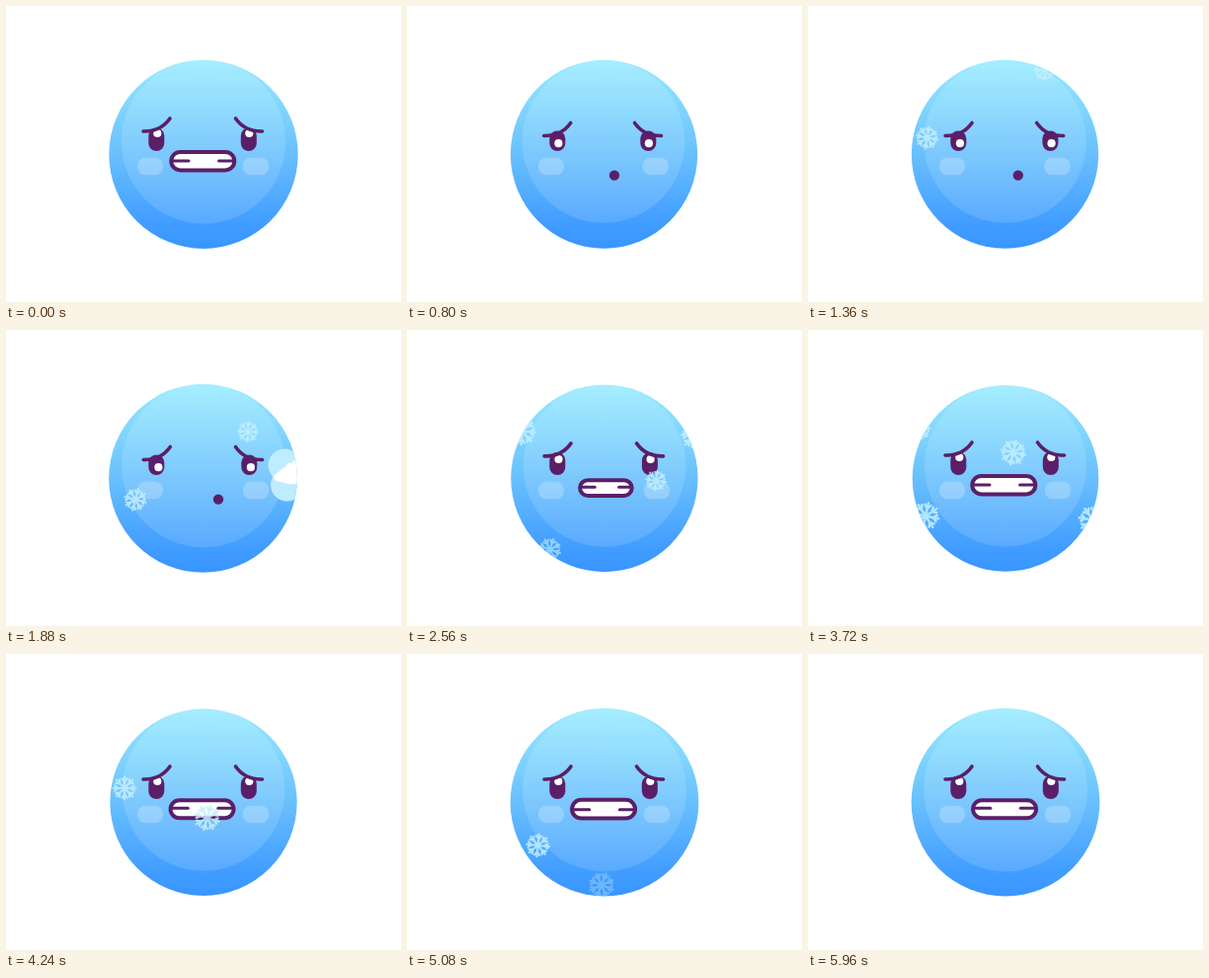
An HTML page with a canvas for the animation above (6000 ms loop, 400x300 px).

```html
<!DOCTYPE html>
<html lang="en">
<head>
<meta charset="utf-8">
<title>Freezing face</title>
<style>
  html, body { margin: 0; width: 100%; height: 100%; overflow: hidden; background: #fff; }
  canvas { display: block; width: 400px; height: 300px; }
</style>
</head>
<body>
<canvas id="stage"></canvas>
<script>
const LOOP = 6000, STEP = 40, TAU = Math.PI * 2;
const DARK = '#5a1f68';
const canvas = document.getElementById('stage');
const ctx = canvas.getContext('2d');
const dpr = window.devicePixelRatio || 1;
canvas.width = 400 * dpr;
canvas.height = 300 * dpr;

// Each flake passes (x, y) at time t; speeds are in px per second.
const flakes = [
  { t: 1880, x: 131, y: 172, vx: 20, vy: 74, r: 12, turn: 0.25 },
  { t: 1880, x: 245, y: 103, vx: 10.6, vy: 73, r: 11, turn: 0.05 },
  { t: 3200, x: 118, y: 150, vx: 2, vy: 74, r: 14.5, turn: 0.15 },
  { t: 3200, x: 212, y: 82, vx: -8, vy: 81, r: 13.5, turn: 0.15 },
  { t: 3200, x: 290, y: 154, vx: -3, vy: 74, r: 15, turn: 0.1 },
  { t: 4240, x: 120, y: 136, vx: 15, vy: 69, r: 12.5, turn: 0 }
];

const clamp = v => Math.max(0, Math.min(1, v));
const mix = (a, b, k) => a + (b - a) * k;
const ease = (t, a, b) => {
  const k = clamp((t - a) / (b - a));
  return k * k * (3 - 2 * k);
};

function ellipse(x, y, rx, ry, fill) {
  ctx.beginPath();
  ctx.ellipse(x, y, rx, ry, 0, 0, TAU);
  ctx.fillStyle = fill;
  ctx.fill();
}

function pill(x, y, w, h, r, fill) {
  ctx.beginPath();
  ctx.roundRect(x - w / 2, y - h / 2, w, h, r);
  ctx.fillStyle = fill;
  ctx.fill();
}

function line(x1, y1, x2, y2) {
  ctx.beginPath();
  ctx.moveTo(x1, y1);
  ctx.lineTo(x2, y2);
  ctx.stroke();
}

function drawBall(rx, ry, cx, turn) {
  const base = ctx.createLinearGradient(0, 55, 0, 245);
  base.addColorStop(0, '#98ebff');
  base.addColorStop(0.5, '#69c0fd');
  base.addColorStop(0.88, '#409cff');
  base.addColorStop(1, '#3996ff');
  ellipse(cx, 150.3, rx, ry, base);
  const k = rx / 95;
  ctx.save();
  ctx.beginPath();
  ctx.ellipse(cx, 150.3, rx, ry, 0, 0, TAU);
  ctx.clip();
  ellipse(cx + turn * 0.5, 137.5, 82.6 * k, 82.6 * k, 'rgba(255,255,255,.13)');
  ctx.restore();
}

function drawEye(x, brow, look, blow) {
  const top = mix(123.5, 126.5, blow), low = 147;
  pill(x, (top + low) / 2, 16, low - top, 8, DARK);
  ellipse(x + look, mix(129, 139.2, blow), 4.1, 4.1, '#fff');
  // The outer end of each brow hangs low; side is mirrored for the right eye.
  const s = brow.side, y = brow.y;
  ctx.strokeStyle = DARK;
  ctx.lineWidth = 3.6;
  ctx.lineCap = 'round';
  ctx.beginPath();
  ctx.moveTo(brow.x - 13.5 * s, y + 6.5);
  ctx.quadraticCurveTo(brow.x + 4 * s, y + 7, brow.x + 13.5 * s, y - 6.5);
  ctx.stroke();
}

function drawMouth(blow, shake, shiver, turn) {
  const x = mix(198.8 + shiver * 0.5, 212.5 + turn * 2.5, blow);
  const y = mix(157.2, 171.6, blow);
  const w = mix(64, 6.4, blow), h = mix(18.4 + shake * 0.4, 6.4, blow);
  const tone = ease(blow, 0.5, 0.95);
  const rgb = [90, 31, 104].map(c => Math.round(mix(255, c, tone)));
  pill(x, y, w, h, Math.min(w, h) / 2, `rgb(${rgb})`);
  ctx.strokeStyle = DARK;
  ctx.lineWidth = 4;
  ctx.stroke();
  if (blow < 0.7) {
    ctx.lineWidth = 3;
    const len = w * 0.23;
    const lineY = y - 0.2 + shake * (1 - blow);
    line(x - w / 2 + 2, lineY, x - w / 2 + 3 + len, lineY);
    line(x + w / 2 - 2, lineY, x + w / 2 - 1 - len, lineY);
  }
}

function drawFlake(f, t) {
  const s = (t - f.t) / 1000;
  const y = f.y + f.vy * s;
  if (y < 30 || y > 270) return;
  ctx.save();
  ctx.translate(f.x + f.vx * s, y);
  ctx.rotate(f.turn + s * 0.12);
  ctx.globalAlpha = 0.85 * clamp((250 - y) / 38);
  ctx.strokeStyle = '#c4efff';
  ctx.lineWidth = f.r * 0.17;
  ctx.lineCap = 'round';
  const r = f.r * 0.92;
  ctx.beginPath();
  for (let i = 0; i < 8; i++) {
    const a = i * TAU / 8, c = Math.cos(a), n = Math.sin(a);
    const at = (u, v) => [c * u - n * v, n * u + c * v];
    ctx.moveTo(0, 0);
    ctx.lineTo(...at(r, 0));
    ctx.moveTo(...at(r * 0.85, r * 0.23));
    ctx.lineTo(...at(r * 0.58, 0));
    ctx.lineTo(...at(r * 0.85, -r * 0.23));
  }
  ctx.stroke();
  ctx.restore();
}

function drawBreath(t) {
  const k = (t - 1360) / 520;
  if (k < 0 || k > 1.9) return;
  const size = mix(0.15, 1, Math.min(k, 1.25));
  ctx.save();
  ctx.translate(mix(220, 283, k), mix(170, 148, k));
  ctx.scale(size, size);
  ctx.globalAlpha = clamp(k * 4);
  ctx.beginPath();
  ctx.arc(-1, -11, 16.5, 0, TAU);
  ctx.moveTo(18, 9);
  ctx.arc(1.5, 9, 16.5, 0, TAU);
  ctx.fillStyle = '#bfecff';
  ctx.fill();
  ctx.beginPath();
  ctx.moveTo(-12, 0);
  ctx.bezierCurveTo(-8, -3, -5, -7, 0, -9);
  ctx.quadraticCurveTo(2, -15, 6, -13);
  ctx.quadraticCurveTo(9, -18, 14, -15);
  ctx.lineTo(18, 7);
  ctx.bezierCurveTo(8, 9, -1, 8, -4, 6);
  ctx.quadraticCurveTo(-12, 6, -12, 0);
  ctx.fillStyle = '#fff';
  ctx.fill();
  ctx.restore();
}

function draw(t) {
  const wave = Math.cos(TAU * t / 240), shake = Math.sin(TAU * t / 240);
  const blow = ease(t, 400, 680) * (1 - ease(t, 2360, 2640));
  const turn = blow * mix(-1, 1, ease(t, 760, 1880));
  const rx = 95 + 0.7 * wave;
  const ry = 95 + mix(0.6 * wave, 0.5, blow);
  const cx = 200 - 0.5 * blow;

  ctx.setTransform(dpr, 0, 0, dpr, 0, 0);
  ctx.fillStyle = '#fff';
  ctx.fillRect(0, 0, 400, 300);
  drawBall(rx, ry, cx, turn);

  const cheek = 'rgba(255,255,255,.23)';
  pill(146, 162.6, 26, 17.5, 8, cheek);
  pill(253 + turn * 0.7 - blow * 0.6, 162.6, 26.5, 17.5, 8, cheek);

  const browY = mix(120.5, 125, blow);
  const look = mix(1, 1.6, blow) + turn * 0.5;
  drawEye(152.3, { x: 152.5 + turn * 0.3, y: browY, side: 1 }, look, blow);
  drawEye(245.8 + turn - blow * 0.5, { x: 246 + turn - blow, y: browY, side: -1 }, look - 0.5, blow);
  drawMouth(blow, shake, wave, turn);

  ctx.save();
  ctx.beginPath();
  ctx.ellipse(cx, 150.3, rx, ry, 0, 0, TAU);
  ctx.clip();
  flakes.forEach(f => drawFlake(f, t));
  drawBreath(t);
  ctx.restore();
}

const start = performance.now();
function tick() {
  const t = Math.max(0, performance.now() - start) % LOOP;
  draw(Math.floor(t / STEP) * STEP);
  requestAnimationFrame(tick);
}
tick();
</script>
</body>
</html>
```
